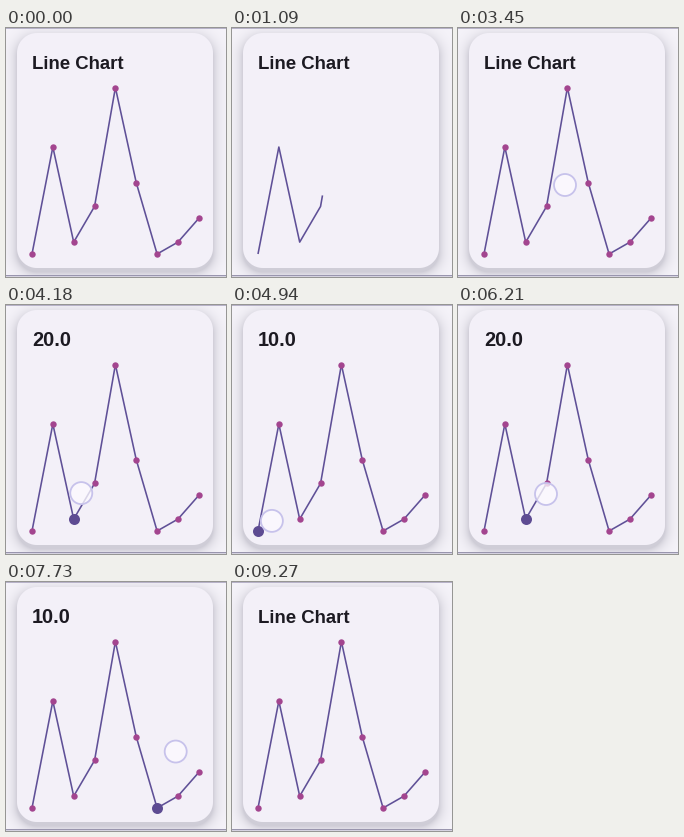
Recreate the animation shown at these times as a matplotlib script. Size 220 px wide and 249 px high, loop 9330 ms.

```python
import numpy as np
import matplotlib.pyplot as plt
from matplotlib.animation import FuncAnimation
from matplotlib.patches import Circle

W, H, DPI = 220, 249, 64
PT = 72 / DPI
STEP, LOOP = 30, 9330

PAGE, CARD, INK = "#f6f4fa", "#f3f0f8", "#1c1a22"
LINE, DOT, PICK = "#5f5097", "#a3458f", "#5d4b92"

# Chart data in stage pixels
values = np.array([10, 100, 20, 50, 150, 70, 10, 20, 40])
px = np.linspace(26, 192.8, len(values))
py = 226 - (values - 10) * 166.4 / 140
dist = np.r_[0, np.cumsum(np.hypot(np.diff(px), np.diff(py)))]

# Timeline in ms
CLEAR, DRAW_START, DRAW_END, DOTS = 420, 580, 1765, 1770
TOUCH, SELECT, RELEASE, FADE = 3450, 3480, 9090, 150

# Pointer path: time, x, y
drag = np.array([
    (3465, 107, 157), (3900, 92, 172), (4360, 65, 198), (4955, 39, 216.5),
    (5210, 32, 227.5), (5610, 32, 227.5), (5900, 53, 211), (6225, 88, 189),
    (6520, 137, 177), (7000, 155, 172), (7480, 166, 170), (7745, 170, 169.5),
    (8100, 188, 167), (8450, 210, 165), (8640, 213, 165),
])


def rgb(code):
    return np.array([int(code[i:i + 2], 16) for i in (1, 3, 5)]) / 255


def card_distance(x, y, radius=20):
    """Signed distance to the rounded card."""
    qx = np.abs(x - 109) - 98 + radius
    qy = np.abs(y - 122.5) - 117.5 + radius
    outer = np.hypot(np.maximum(qx, 0), np.maximum(qy, 0))
    return outer + np.minimum(np.maximum(qx, qy), 0) - radius


def backdrop():
    y, x = np.mgrid[0:H, 0:W] + 0.5
    shade = 0.24 * np.exp(-np.maximum(card_distance(x, y - 4), 0) / 5.5)
    img = rgb(PAGE) * (1 - shade[..., None]) + rgb("#57546a") * shade[..., None]
    cover = np.clip(0.5 - card_distance(x, y), 0, 1)[..., None]
    img = img * (1 - cover) + rgb(CARD) * cover
    img[0] = rgb("#b7b2c8")
    img[-2] = rgb("#9995ae")
    img[-1] = rgb("#d5d2e0")
    return img


fig = plt.figure(figsize=(W / DPI, H / DPI), dpi=DPI)
ax = fig.add_axes([0, 0, 1, 1])
ax.imshow(backdrop(), extent=(0, W, H, 0), interpolation="nearest", aspect="auto")
ax.set(xlim=(0, W), ylim=(H, 0))
ax.axis("off")

title = ax.text(26, 40.5, "", color=INK, family="Liberation Sans", weight="bold",
                va="baseline", ha="left")
line, = ax.plot([], [], color=LINE, lw=1.6 * PT, solid_joinstyle="round",
                solid_capstyle="butt", zorder=2)
dots, = ax.plot(px, py, "o", color=DOT, ms=6.4 * PT, mew=0, zorder=3)
picked, = ax.plot([], [], "o", color=PICK, ms=11 * PT, mew=0, zorder=4)
pointer = ax.add_patch(Circle((0, 0), 11, lw=1.8 * PT, zorder=5))


def set_line(progress):
    end = progress * dist[-1]
    keep = dist < end
    line.set_data(np.r_[px[keep], np.interp(end, dist, px)],
                  np.r_[py[keep], np.interp(end, dist, py)])


def update(i):
    t = i * STEP + STEP / 2

    if t < CLEAR:
        set_line(1)
    else:
        set_line(np.clip((t - DRAW_START) / (DRAW_END - DRAW_START), 0, 1))
    line.set_visible(not CLEAR <= t < DRAW_START)
    dots.set_visible(not CLEAR <= t < DOTS)

    x, y = (np.interp(t, drag[:, 0], drag[:, k]) for k in (1, 2))
    alpha = np.clip(1 - (t - RELEASE) / FADE, 0, 1) if t >= TOUCH else 0
    pointer.center = x, y
    pointer.set_facecolor((0.99, 0.98, 1, 0.78 * alpha))
    pointer.set_edgecolor((0.78, 0.76, 0.92, alpha))

    if SELECT <= t < RELEASE:
        k = int(np.clip((x - px[0]) / (px[1] - px[0]), 0, len(px) - 1))
        picked.set_data([px[k]], [py[k]])
        title.set_text(f"{values[k]:.1f}")
        title.set_fontsize(20 * PT)
    else:
        picked.set_data([], [])
        title.set_text("Line Chart")
        title.set_fontsize(18.6 * PT)
    return title, line, dots, picked, pointer


anim = FuncAnimation(fig, update, frames=LOOP // STEP, interval=STEP,
                     repeat=True, repeat_delay=0, blit=False)
plt.show()
```
